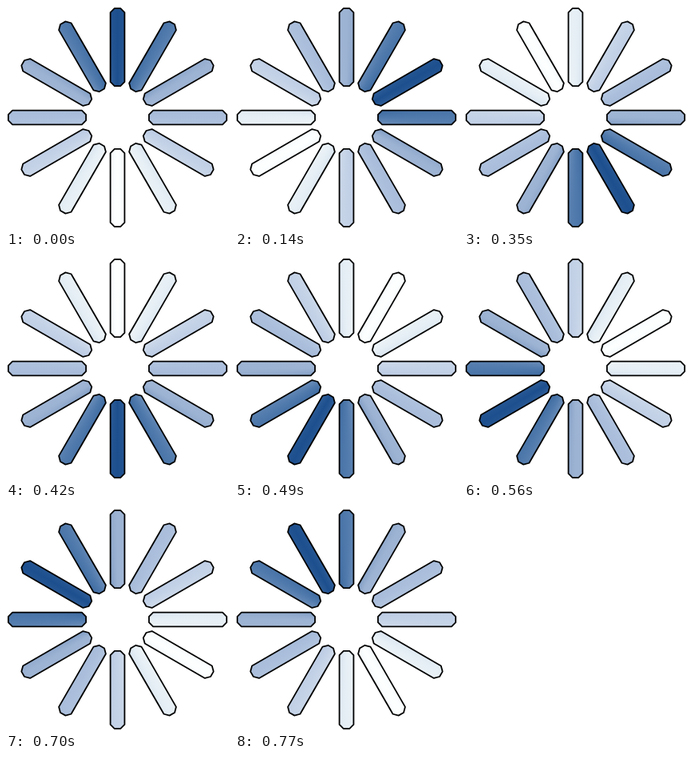
An HTML page with a canvas for the animation above (840 ms loop, 279x279 px).

```html
<!DOCTYPE html>
<html lang="en">
<head>
<meta charset="utf-8">
<title>Spinner</title>
<style>
  html, body { margin: 0; width: 100%; height: 100%; overflow: hidden; background: #fff; }
  canvas { display: block; width: 279px; height: 279px; }
</style>
</head>
<body>
<canvas id="stage" width="279" height="279"></canvas>
<script>
const ctx = document.getElementById('stage').getContext('2d');
const SIZE = 279, MID = SIZE / 2;
const SPOKES = 12, STEP_MS = 70, TURN = Math.PI * 2;
const INNER = 39.4, OUTER = 136.6, HALF = 8.9, CUT = 5.2;

// Shades from the leading spoke round to the opposite one, mirrored on both sides
const SHADES = ['#1d4f8e', '#507aac', '#9db3d3', '#abbfdc', '#c4d2e7', '#e6eff5', '#fdffff'];

function spokePath() {
  const corners = [
    [-HALF, -OUTER + CUT], [-HALF + CUT, -OUTER], [HALF - CUT, -OUTER], [HALF, -OUTER + CUT],
    [HALF, -INNER - CUT], [HALF - CUT, -INNER], [-HALF + CUT, -INNER], [-HALF, -INNER - CUT]
  ];
  const path = new Path2D();
  corners.forEach(([x, y]) => path.lineTo(x, y));
  path.closePath();
  return path;
}

const spokes = new Path2D();
const spoke = spokePath();
for (let i = 0; i < SPOKES; i++) {
  const turn = new DOMMatrix().translate(MID, MID).rotate(i * 360 / SPOKES);
  spokes.addPath(spoke, turn);
}

function draw(step) {
  const sweep = ctx.createConicGradient(step / SPOKES * TURN - TURN / 4, MID, MID);
  for (let i = 0; i <= SPOKES; i++) {
    sweep.addColorStop(i / SPOKES, SHADES[Math.min(i, SPOKES - i)]);
  }
  ctx.fillStyle = '#fff';
  ctx.fillRect(0, 0, SIZE, SIZE);
  ctx.fillStyle = sweep;
  ctx.fill(spokes);
  ctx.lineWidth = 1.8;
  ctx.lineJoin = 'round';
  ctx.strokeStyle = '#000';
  ctx.stroke(spokes);
}

const start = performance.now();
let shown = -1;
function tick() {
  const step = Math.floor((performance.now() - start) / STEP_MS) % SPOKES;
  if (step !== shown) draw(shown = step);
  requestAnimationFrame(tick);
}
tick();
</script>
</body>
</html>
```
